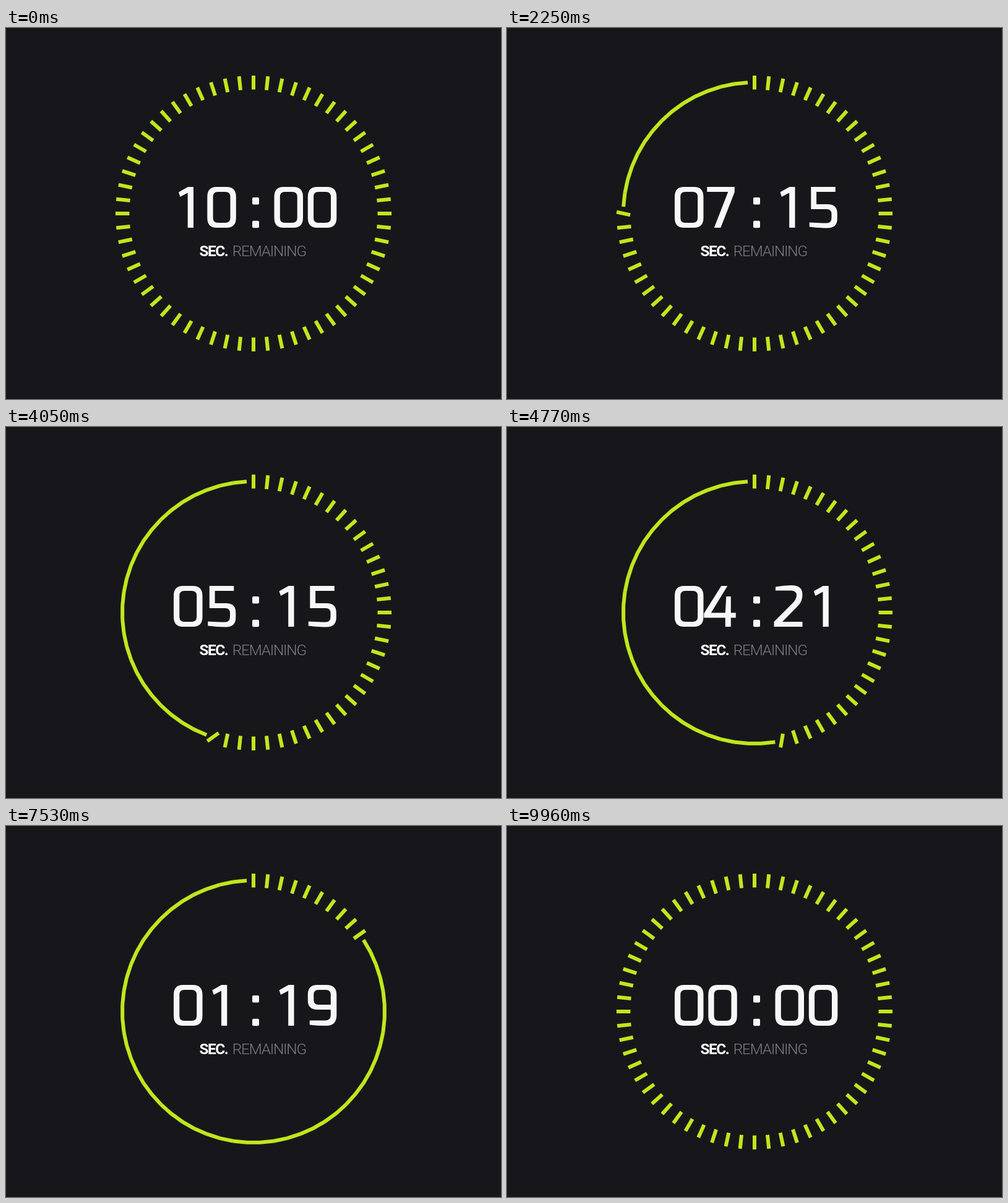
Animation of 800x600 px, one loop 9.99 s. Source, as an HTML page:

```html
<!DOCTYPE html>
<html lang="en">
<head>
<meta charset="utf-8">
<title>Countdown</title>
<style>
html, body { margin: 0; width: 100%; height: 100%; overflow: hidden; background: #17171b; }
svg { display: block; width: 100vw; height: 100vh; }
text { font-family: Roboto, "Open Sans", sans-serif; font-size: 24.4px; }
</style>
</head>
<body>
<svg viewBox="0 0 800 600">
  <g id="ring" fill="#c0e71d"></g>
  <g id="clock" fill="#f7f7f8" fill-rule="evenodd" role="img">
    <rect x="398" y="274" width="11" height="11.5" rx="2"/>
    <rect x="398" y="311.7" width="11" height="11.5" rx="2"/>
  </g>
  <text x="312.5" y="369.3" fill="#fff" font-weight="700" letter-spacing="-1.5">SEC.</text>
  <text x="365.8" y="369.3" fill="#7e7e81" font-weight="300" letter-spacing="-1.25">REMAINING</text>
</svg>
<script>
const FRAME = 30, FRAMES = 333, FPS = 30, TOTAL = 300;
const TICKS = 60, RADIUS = 211.8, LENGTH = 22.5, WIDTH = 6;
const FIRST = 5, STEP = 290 / 59, TURN = 5;   // frames: first start, stagger, duration
const RESET = 318, RESET_LEN = 14;

// Digit outlines in a 48 x 66 cell
const nine = "M16 0H31Q47.5 0 47.5 16V49Q47.5 66 31 66Q16 66 4 64.5V57.5H29Q38 57.5 38 49V40H17Q1 40 1 25V16Q1 0 16 0Z" +
  "M18 8Q10.5 8 10.5 16V24Q10.5 32 18 32H38V16Q38 8 30 8Z";
const glyphs = [
  "M16 0H32Q47.5 0 47.5 16V50Q47.5 66 32 66H16Q1 66 1 50V16Q1 0 16 0ZM18 8Q10.3 8 10.3 16V50Q10.3 58 18 58H30Q38.2 58 38.2 50V16Q38.2 8 30 8Z",
  "M9 8.5L24 0H33V66H23.7V9.5L11.5 16Z",
  "M1.5 1.5Q14 -1 27 -1Q45 -1 45 14Q45 25 38 32L12.5 58H45V66H-1V58L29 28Q35.5 21.5 35.5 15Q35.5 7.5 26 7.5H1.5Z",
  "M2 1.5Q16 -1 28 -1Q44 -1 44 12V20Q44 30 36 32Q45.5 34 45.5 44V51Q45.5 67 29 67Q14 67 1 64.5V57.5Q15 58.5 27 58.5Q36 58.5 36 51V44Q36 36 28 36H9V28.5H27Q34.5 28 34.5 20V14Q34.5 7.5 27 7.5H2Z",
  "M22 0H32L5.5 43.5H28.5L30 17H37.5V43.5H45.5V51.5H37.5V66H28.5V51.5H-6V44.5Z",
  "M4.5 0H44V8H13.3V28H31Q47 28 47 43V51Q47 66.5 31 66.5Q16 66.5 2 64.5V57.5Q18 58.5 30 58.5Q37.7 58.5 37.7 50V44Q37.7 36 30 36H4.5Z",
  nine,
  "M-1 0H43.5V8.5L21 66H10.5L33 8H-1Z",
  "M16 0H32Q46 0 46 13V21Q46 30 38 32.5Q47.5 35 47.5 45V51Q47.5 66 31 66H17Q1 66 1 51V45Q1 35 10 32.5Q2.5 30 2.5 21V13Q2.5 0 16 0Z" +
    "M18 7.5Q12 7.5 12 14V21Q12 29 19 29H30Q36.5 29 36.5 21V14Q36.5 7.5 30 7.5Z" +
    "M18 36.5Q10.5 36.5 10.5 45V50Q10.5 58 18 58H30Q38 58 38 50V45Q38 36.5 30 36.5Z",
  nine
];
const slots = [270, 324.3, 432.5, 486.8];

const ring = document.getElementById("ring");
const clock = document.getElementById("clock");

function add(parent, tag, attrs) {
  const el = document.createElementNS("http://www.w3.org/2000/svg", tag);
  for (const key in attrs) el.setAttribute(key, attrs[key]);
  return parent.appendChild(el);
}

const ticks = Array.from({ length: TICKS }, () =>
  add(ring, "rect", { x: -WIDTH / 2, y: -LENGTH / 2, width: WIDTH, height: LENGTH }));
const digits = slots.map(() => add(clock, "path", {}));

// Sine ease in and out, clamped to 0..1
const ease = p => (1 - Math.cos(Math.PI * Math.min(1, Math.max(0, p)))) / 2;

function render(ms) {
  const frame = Math.floor(ms / FRAME) % FRAMES;
  const left = Math.max(0, TOTAL - frame);
  const pad = n => String(n).padStart(2, "0");
  const time = pad(Math.floor(left / FPS)) + pad(left % FPS);

  clock.setAttribute("aria-label", time.slice(0, 2) + " : " + time.slice(2));
  digits.forEach((el, i) => {
    const flip = time[i] === "6" ? " rotate(180 24.25 33)" : "";
    el.setAttribute("d", glyphs[time[i]]);
    el.setAttribute("transform", `translate(${slots[i]} 257)${flip}`);
  });

  const back = ease((frame - RESET) / RESET_LEN);
  ticks.forEach((el, i) => {
    const turn = 90 * ease((frame - FIRST - i * STEP) / TURN) * (1 - back);
    el.setAttribute("transform",
      `translate(400 300) rotate(${-(i + 1) * 360 / TICKS}) translate(0 ${-RADIUS}) rotate(${turn})`);
  });
}

const start = performance.now();
function loop() {
  render(performance.now() - start);
  requestAnimationFrame(loop);
}
render(0);
requestAnimationFrame(loop);
</script>
</body>
</html>
```
